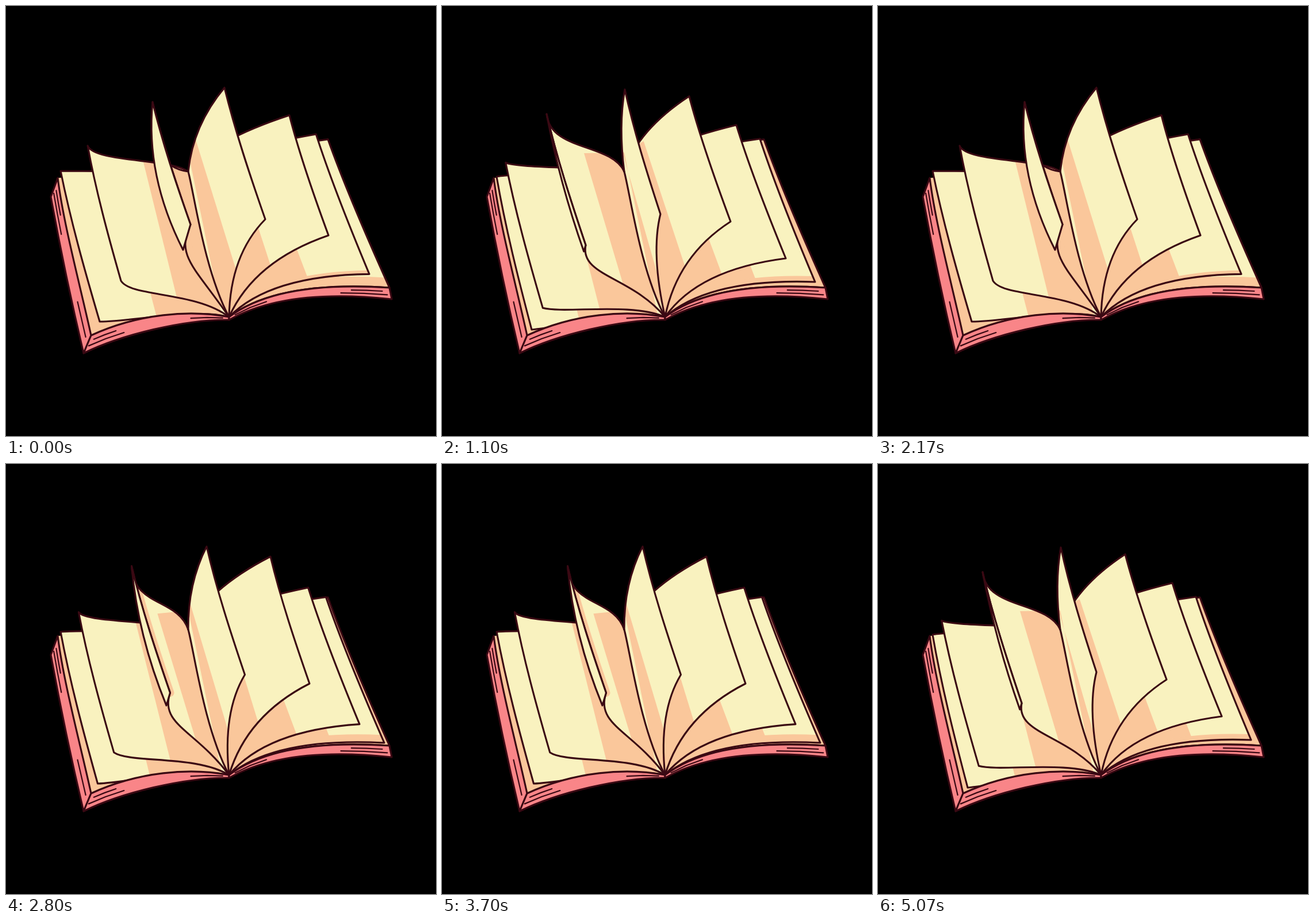
Write an HTML page with a canvas that moves like this. It is 748x748 px and loops after 5110 ms.

```html
<!DOCTYPE html>
<html lang="en">
<head>
<meta charset="utf-8">
<title>Turning pages</title>
<style>
html, body { margin: 0; width: 100%; height: 100%; overflow: hidden; background: #000; }
canvas { display: block; width: 100vmin; height: 100vmin; }
</style>
</head>
<body>
<canvas id="stage" width="748" height="748"></canvas>
<script>
const ctx = document.getElementById('stage').getContext('2d');
const LOOP = 5110, HOLD = 100, POSES = 3, UPRIGHT = 12;
const CREAM = '#f9f2bf', PEACH = '#fac79b', PINK = '#f98588', INK = '#3a0913';
const HEAD = [317, 288], HINGE = [388, 541];

// One leaf turning from right to left: [step, tip, lower corner].
const TURN = [
  [0, [560, 232], [667, 490]],
  [2, [553, 231], [649, 480]],
  [5, [512, 207], [598, 439]],
  [6, [493, 190], [561, 399]],
  [7, [460, 161], [528, 382]],
  [8, [430, 157], [502, 375]],
  [9, [380, 142], [451, 371]],
  [11, [318, 145], [380, 362]],
  [12, [255, 167], [321, 380]],
  [14, [182, 188], [250, 416]],
  [15, [142, 243], [200, 478]],
  [18, [95, 287], [163, 549]],
  [20, [95, 297], [156, 563]]
];

const mix = (a, b, t) => a.map((v, i) => v + (b[i] - v) * t);
const shift = (p, x, y = 0) => [p[0] + x, p[1] + y];
const flip = curve => [...curve].reverse();

function pointOn(curve, t) {
  while (curve.length > 1) curve = curve.slice(1).map((p, i) => mix(curve[i], p, t));
  return curve[0];
}

// Cubic curves joined end to end.
function join(...curves) {
  const path = new Path2D();
  curves.forEach(([a, b, c, d], n) => {
    if (n) path.lineTo(...a); else path.moveTo(...a);
    path.bezierCurveTo(...b, ...c, ...d);
  });
  return path;
}

function polygon(...points) {
  const path = new Path2D();
  points.forEach(p => path.lineTo(...p));
  return path;
}

function fill(path, color) {
  ctx.fillStyle = color;
  ctx.fill(path);
}

function line(path, width = 3.1, color = INK) {
  ctx.lineWidth = width;
  ctx.strokeStyle = color;
  ctx.stroke(path);
}

const spine = [HEAD, [328, 330], [345, 460], HINGE];

function topEdge(step, tip) {
  const dx = tip[0] - HEAD[0], dy = tip[1] - HEAD[1];
  const [ax, ay, bx, by] = step < UPRIGHT ? [.2, .37, .53, .7]
    : step === UPRIGHT ? [.6, .05, .85, .3] : [.12, .5, .9, .35];
  return [HEAD, shift(HEAD, ax * dx - 7, ay * dy), shift(HEAD, bx * dx - 7, by * dy), tip];
}

function bottomEdge(step, corner) {
  const [x, y] = corner;
  if (step < UPRIGHT) {
    const pull = shift(HINGE, .38 * (x - HINGE[0]) - 22, .37 * (y - HINGE[1]) - 45);
    return [corner, mix(corner, pull, 2 / 3), mix(HINGE, pull, 2 / 3), HINGE];
  }
  const drop = Math.min(55, (550 - y) * .4);
  return [corner, shift(corner, (y - 440) * .45, drop), [330, 300 + .41 * y], HINGE];
}

function makeLeaf(step) {
  const n = Math.max(1, TURN.findIndex(key => key[0] >= step));
  const [from, tipA, cornerA] = TURN[n - 1], [to, tipB, cornerB] = TURN[n];
  const t = (step - from) / (to - from);
  const tip = mix(tipA, tipB, t), corner = mix(cornerA, cornerB, t);
  const top = topEdge(step, tip), bottom = bottomEdge(step, corner);
  const side = [tip, shift(mix(tip, corner, 1 / 3), -5), shift(mix(tip, corner, 2 / 3), -3), corner];
  return { step, tip, corner, top, side, bottom };
}

// The back of a leaf that has just passed upright.
function drawCurl({ tip, corner, side }, width) {
  const end = shift(corner, -width / 2, width * 1.7);
  const back = [tip, shift(mix(tip, end, 1 / 3), -width), shift(mix(tip, end, 2 / 3), -width), end];
  const path = join(back, flip(side));
  fill(path, CREAM);
  line(path);
}

function drawLeaf(leaf) {
  const { step, tip, corner, top, side, bottom } = leaf;
  const face = join(top, side, bottom, flip(spine));
  const curl = step < UPRIGHT ? 0 : 26 * .5 ** (step - UPRIGHT);
  fill(face, step === UPRIGHT ? PEACH : CREAM);

  // Shade toward the spine, parallel to the free edge.
  const low = pointOn(bottom, .7 - .04 * Math.abs(step - UPRIGHT));
  const high = shift(low, tip[0] - corner[0], tip[1] - corner[1]);
  ctx.save();
  ctx.clip(face);
  fill(polygon(high, low, [388, 600], [317, 255]), PEACH);
  if (step < 4) line(join(bottom), 34 - 7 * step, PEACH);
  if (curl > 6) line(join(side), 2 * (curl - 6), PEACH);
  ctx.restore();

  line(join(top, side, bottom));
  if (curl > 6) drawCurl(leaf, curl);
}

// Page block: [outer edge, inner edge] of each visible strip.
const base = makeLeaf(0);
const rim = [[90, 299], [100, 380], [130, 490], [148, 573]];
const front = [[148, 573], [230, 535], [320, 528], HINGE];
const strips = [
  [[[78, 332], [95, 425], [115, 520], [135, 604]], rim],
  [[[135, 604], [200, 572], [310, 545], [388, 546]], front],
  [[[671, 510], [580, 500], [470, 500], [388, 546]], base.bottom]
];

function drawStrip([outer, inner]) {
  const path = join(outer, flip(inner));
  path.closePath();
  fill(path, PINK);
  line(path);
  for (const [depth, from, to] of [[.35, .02, .28], [.65, .04, .2], [.5, .72, .95]]) {
    const mid = outer.map((p, i) => mix(p, inner[i], depth));
    line(polygon(...[0, .5, 1].map(s => pointOn(mid, from + (to - from) * s))), 2.2);
  }
}

function drawBook(pose) {
  fill(polygon([0, 0], [748, 0], [748, 748], [0, 748]), '#000');
  fill(join(rim, front, flip(spine)), PEACH);
  const right = join(base.top, base.side, base.bottom, flip(spine));
  fill(right, PEACH);
  line(right);
  // Outer leaves first on each side, the middle ones on top.
  for (const i of [6, 5, 4, 0, 1, 2, 3]) drawLeaf(makeLeaf(i * POSES + pose));
  line(join(spine));
  strips.forEach(drawStrip);
}

ctx.lineCap = ctx.lineJoin = 'round';
const start = performance.now();
let shown = -1;

function tick() {
  const t = (performance.now() - start) % LOOP;
  // The last drawing stays up for the short remainder of the loop.
  const pose = Math.min(Math.floor(t / HOLD), 50) % POSES;
  if (pose !== shown) drawBook(shown = pose);
  requestAnimationFrame(tick);
}
tick();
</script>
</body>
</html>
```
